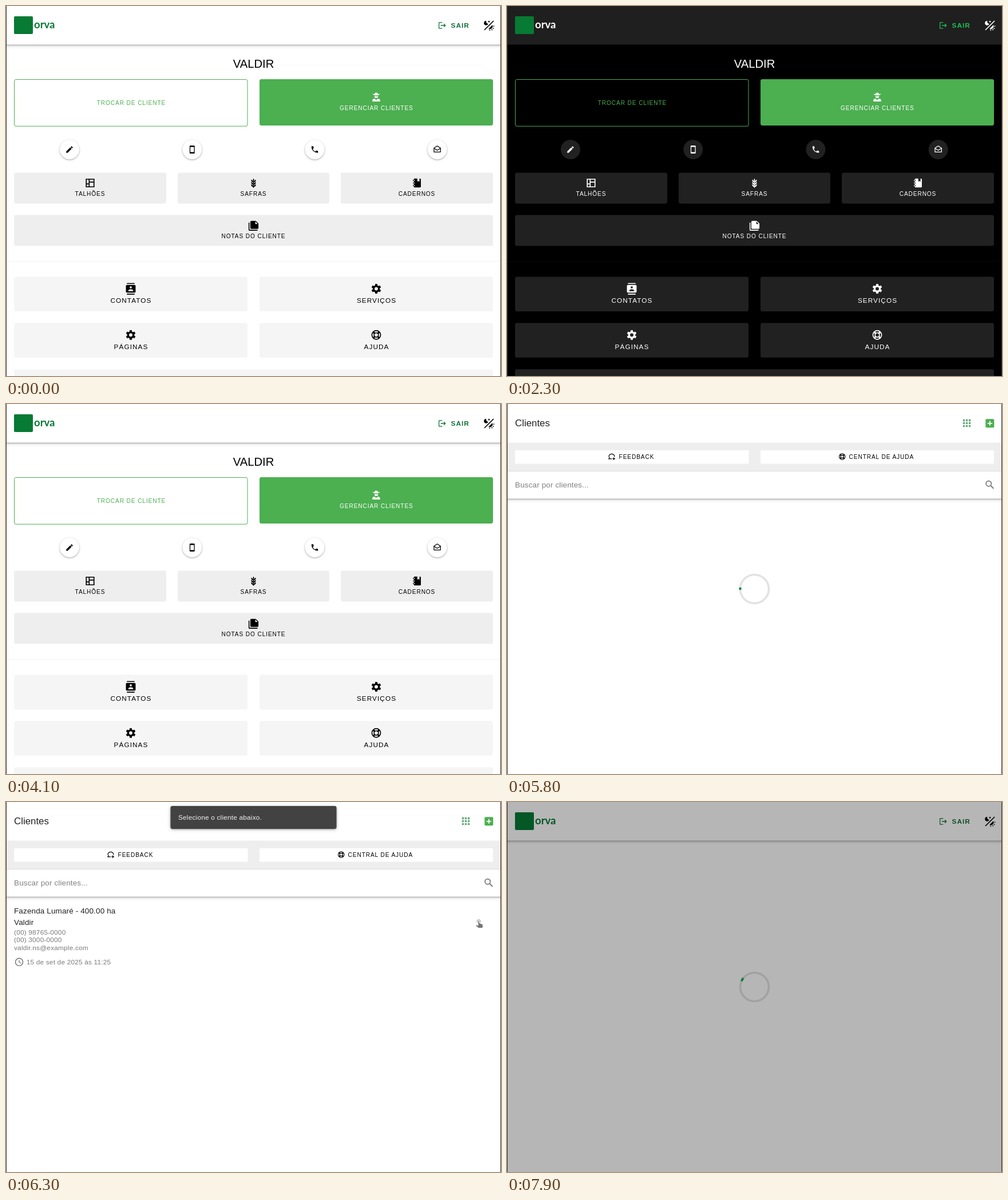
These frames come from a looping animation (865 px wide and 647 px high, 8 s). An HTML page:

```html
<!DOCTYPE html>
<html lang="pt-BR">
<head>
<meta charset="utf-8">
<title>Clientes</title>
<style>
html, body { margin: 0; width: 100%; height: 100%; overflow: hidden; background: #fff; }
svg { display: block; width: 865px; height: 647px; }
text { font-family: "Liberation Sans", Arial, sans-serif; white-space: pre; }
.btn { font-size: 10.125px; letter-spacing: .0893em; }
.big { font-size: 11.8px; letter-spacing: .0893em; }
.body { font-size: 13.5px; letter-spacing: .0094em; }
.small { font-size: 11.8px; letter-spacing: .0179em; }
.ink { fill: var(--ink); color: var(--ink); }
.accent { fill: var(--accent); color: var(--accent); }
.green { fill: #4caf50; }
.line { fill: none; stroke: currentColor; }
.raised { filter: drop-shadow(0 1.5px 1px rgba(0,0,0,.24)) drop-shadow(0 1px 2px rgba(0,0,0,.14)); }
.bar { filter: drop-shadow(0 1.5px 1.5px rgba(0,0,0,.3)) drop-shadow(0 1px 3px rgba(0,0,0,.18)); }
</style>
</head>
<body>
<svg id="stage" viewBox="0 0 865 647" xmlns="http://www.w3.org/2000/svg"></svg>
<script>
const LOOP = 8000, STEP = 100;
const DARK_AT = 1200, LIGHT_AT = 2400, LIST_AT = 5800, READY_AT = 6300, LOAD_AT = 7900;
const FADE = 280;
const GREEN = '#077a34';
const stage = document.getElementById('stage');

const fill = d => `<path d="${d}" fill-rule="evenodd"/>`;
const line = (d, w = 2) => `<path class="line" d="${d}" stroke-width="${w}"/>`;
const ring = (r, w = 2) => `<circle class="line" cx="12" cy="12" r="${r}" stroke-width="${w}"/>`;
const spokes = (n, from, a, b, w) => Array.from({ length: n }, (_, i) =>
  `<g transform="rotate(${from + i * 360 / n} 12 12)">${line(`M12 ${12 - a}V${12 - b}`, w)}</g>`).join('');
const leaves = [4, 9.25, 14.5].map(y =>
  `M11 ${y + 4.4}Q10 ${y + 2} 6.5 ${y}Q6 ${y + 5} 11 ${y + 6.8}ZM13 ${y + 4.4}Q14 ${y + 2} 17.5 ${y}Q18 ${y + 5} 13 ${y + 6.8}Z`).join('');
const squares = [4, 10, 16].flatMap(x => [4, 10, 16].map(y => `M${x} ${y}h4v4h-4z`)).join('');

const ICONS = {
  pencil: fill('M20.71 7.04C21.1 6.65 21.1 6 20.71 5.63L18.37 3.29C18 2.9 17.35 2.9 16.96 3.29L15.12 5.12L18.87 8.87M3 17.25V21H6.75L17.81 9.93L14.06 6.18Z'),
  mobile: fill('M17 19H7V5H17M17 1H7A2 2 0 0 0 5 3V21A2 2 0 0 0 7 23H17A2 2 0 0 0 19 21V3A2 2 0 0 0 17 1Z'),
  phone: fill('M6.62 10.79C8.06 13.62 10.38 15.94 13.21 17.38L15.41 15.18C15.69 14.9 16.08 14.82 16.43 14.93C17.55 15.3 18.75 15.5 20 15.5A1 1 0 0 1 21 16.5V20A1 1 0 0 1 20 21A17 17 0 0 1 3 4A1 1 0 0 1 4 3H7.5A1 1 0 0 1 8.5 4C8.5 5.25 8.7 6.45 9.07 7.57C9.18 7.92 9.1 8.31 8.82 8.59Z'),
  mail: line('M3 8L12 2L21 8V18Q21 19 20 19H4Q3 19 3 18ZM3 8.5L12 14L21 8.5'),
  plots: line('M4 4H20V20H4ZM10 4V20M10 10H20M4 14H10'),
  wheat: fill(leaves + 'M12 1.2Q9.2 5.5 12 9.5Q14.8 5.5 12 1.2ZM11 9H13V23H11Z'),
  notebook: fill('M3 7V5H5V4A2 2 0 0 1 7 2H13V9L15.5 7.5L18 9V2H19A2 2 0 0 1 21 4V20A2 2 0 0 1 19 22H7A2 2 0 0 1 5 20V19H3V17H5V13H3V11H5V7ZM5 5V7H7V5ZM5 11V13H7V11ZM5 17V19H7V17Z'),
  notes: fill('M16 9H21.5L16 3.5V9M7 2H17L23 8V18A2 2 0 0 1 21 20H7A2 2 0 0 1 5 18V4A2 2 0 0 1 7 2M3 6V22H21V24H3A2 2 0 0 1 1 22V6Z'),
  contacts: fill('M20 0H4V2H20ZM4 24H20V22H4ZM20 4H4A2 2 0 0 0 2 6V18A2 2 0 0 0 4 20H20A2 2 0 0 0 22 18V6A2 2 0 0 0 20 4M12 6.75A2.25 2.25 0 0 1 12 11.25A2.25 2.25 0 0 1 12 6.75M17 17H7V15.5C7 13.83 10.33 13 12 13C13.67 13 17 13.83 17 15.5Z'),
  cog: ring(5.5, 4) + spokes(6, 0, 6.5, 10, 4.8),
  buoy: ring(9) + ring(4.5) + spokes(4, 45, 4.5, 9, 3.6),
  farmer: fill('M8.5 5.5Q9 2 10.5 2.5Q12 3.5 13.5 2.5Q15 2 15.5 5.5Q18 5.5 20 4.5Q18.5 8.2 12 8.2Q5.5 8.2 4 4.5Q6 5.5 8.5 5.5ZM8 9.5A4 4.2 0 0 0 16 9.5Q12 10.6 8 9.5ZM4 21V19Q4 15 8.5 15L12 17.5L15.5 15Q20 15 20 19V21Z'),
  exit: fill('M17 7L15.59 8.41L18.17 11H8V13H18.17L15.59 15.58L17 17L22 12M4 5H12V3H4A2 2 0 0 0 2 5V19A2 2 0 0 0 4 21H12V19H4Z'),
  theme: line('M2.5 21.5L21.5 2.5') + line('M21 13.5H23M20 17.5L21.8 18.8M17.5 20L18.8 21.8M13.5 21V23', 1.8) +
    fill('M6.5 2.5A4.6 4.6 0 1 0 10.5 8.5A4.4 4.4 0 0 1 6.5 2.5ZM11 19A6 6 0 0 0 19 11ZM12 1.5L12.8 3.2L14.5 4L12.8 4.8L12 6.5L11.2 4.8L9.5 4L11.2 3.2Z'),
  grid: fill(squares),
  chat: line('M12 18.5H3.5L5.6 15.6A8.2 6.8 0 1 1 20 12.5') + line('M18 14V22M14 18H22'),
  search: ring(0) + line('M14 14L19.7 19.7', 2.2) + '<circle class="line" cx="9.5" cy="9.5" r="5.5" stroke-width="2"/>',
  tap: line('M8.5 12A3.5 3.5 0 1 1 13.5 12', 1) +
    fill('M10 9A1 1 0 0 1 12 9V13.47L13.21 13.6L18.15 15.79Q19 16.2 19 17.14V21.5Q18.9 22.9 17.5 23H11Q10.4 23 10 22.57L5.1 18.37L5.84 17.6Q6.2 17.2 6.8 17.28L10 19Z'),
  clock: ring(9) + line('M12 7V12.4L16.2 15', 1.6)
};

const icon = (name, x, y, size = 20.25, cls = 'ink') =>
  `<g class="${cls}" transform="translate(${x - size / 2} ${y - size / 2}) scale(${size / 24})">${ICONS[name]}</g>`;
const rect = (x, y, w, h, attrs = '') => `<rect x="${x}" y="${y}" width="${w}" height="${h}" ${attrs}/>`;
const label = (s, x, y, cls, attrs = '') => `<text x="${x}" y="${y}" class="${cls}" ${attrs}>${s}</text>`;
const mid = (s, x, y, cls, attrs = '') => label(s, x, y, cls, 'text-anchor="middle" ' + attrs);
const round = 'rx="3.4"';

// Grey tiles carry their light shade; the theme fade mixes it towards dark.
const tile = (x, y, w, h, shade) => rect(x, y, w, h, `${round} class="tile" data-shade="${shade}"`);
const tileBtn = (x, w, y, text, name, size) =>
  tile(x, y, w, 54, 238) + icon(name, x + w / 2, y + 18, size) + mid(text, x + w / 2, y + 40.5, 'btn ink');
const menuBtn = (x, y, text, name) =>
  tile(x, y, 408, 60.5, 245) + icon(name, x + 204, y + 21) + mid(text, x + 204.5, y + 45.5, 'big ink');
const roundBtn = (x, name) =>
  `<circle class="tile raised" data-shade="255" cx="${x}" cy="251" r="17"/>` + icon(name, x, 251, 15.2);

const header = rect(-8, -8, 881, 75.5, 'class="bar" style="fill:var(--bar)"') +
  `<g class="logo">${rect(14, 18, 33, 31, `rx="2" fill="${GREEN}"`)}
   <text x="49" y="38.5" style="font:bold 18.5px Lato,sans-serif;fill:var(--word)">orva</text></g>` +
  icon('exit', 762.3, 34, 15.2, 'accent') +
  label('SAIR', 777.5, 38, 'big accent', 'font-weight="bold"') +
  icon('theme', 844, 34);

const home = mid('VALDIR', 432.5, 108, 'ink', 'font-size="20.25"') +
  rect(14.5, 128.5, 407.5, 81.7, 'rx="3" fill="none" stroke="#4caf50"') +
  mid('TROCAR DE CLIENTE', 219, 172.8, 'btn green') +
  rect(443, 128, 408, 81, round + ' class="green"') +
  `<g style="--ink:#fff">${icon('farmer', 647, 159.5)}${mid('GERENCIAR CLIENTES', 647.4, 182, 'btn ink')}</g>` +
  roundBtn(111, 'pencil') + roundBtn(325.3, 'mobile') + roundBtn(539.5, 'phone') + roundBtn(753.6, 'mail') +
  tileBtn(14, 266, 291.5, 'TALHÕES', 'plots') +
  tileBtn(300, 265, 291.5, 'SAFRAS', 'wheat', 18) +
  tileBtn(585, 266, 291.5, 'CADERNOS', 'notebook', 18.5) +
  tileBtn(14, 837, 365.5, 'NOTAS DO CLIENTE', 'notes', 18.8) +
  rect(1, 446, 863, 1, 'style="fill:var(--rule)"') +
  menuBtn(14, 473.5, 'CONTATOS', 'contacts') + menuBtn(443, 473.5, 'SERVIÇOS', 'cog') +
  menuBtn(14, 554.3, 'PÁGINAS', 'cog') + menuBtn(443, 554.3, 'AJUDA', 'buoy') +
  tile(14, 635.3, 837, 40, 245);

const rows = [['(00) 98765-0000', 232], ['(00) 3000-0000', 245.4], ['valdir.ns@example.com', 258.8], ];
const list = rect(-8, 60, 881, 105.5, 'fill="#fff" class="bar"') +
  rect(0, 0, 865, 68, 'fill="#fff"') + rect(0, 67.5, 865, 50, 'fill="#eee"') + rect(0, 117, 865, 1, 'fill="#ddd"') +
  label('Clientes', 14, 39, '', 'font-size="16.875" fill="#212121"') +
  `<g fill="#66a67d">${icon('grid', 803.5, 33.5, 20.25, '')}</g>` +
  rect(836.3, 26.3, 15, 15, 'rx="2" class="green"') +
  '<path d="M843.8 29.8V37.8M839.8 33.8H847.8" stroke="#fff" stroke-width="1.8"/>' +
  rect(14, 81, 408.5, 23.5, 'rx="2" fill="#fff"') + rect(443, 81, 408, 23.5, 'rx="2" fill="#fff"') +
  icon('chat', 183, 92, 14.5) + label('FEEDBACK', 195.6, 96, 'btn ink') +
  icon('buoy', 585.7, 92, 13.8) + label('CENTRAL DE AJUDA', 597.6, 96, 'btn ink') +
  label('Buscar por clientes...', 14, 146, 'body', 'fill="#808080"') +
  `<g style="--ink:#757575">${icon('search', 843.8, 141.3)}</g>`;

const results = label('Fazenda Lumaré - 400.00 ha', 14, 195, 'body', 'fill="#212121"') +
  label('Valdir', 14, 215, 'body', 'fill="#212121"') +
  rows.map(([s, y]) => label(s, 14, y, 'small', 'fill="#7a7a7a"')).join('') +
  label('15 de set de 2025 às 11:25', 35.7, 283.5, 'small', 'fill="#7a7a7a"') +
  `<g style="--ink:#757575">${icon('clock', 23, 279.8, 17.5)}${icon('tap', 827, 210.8)}</g>` +
  rect(287.5, 7, 290, 40, round + ' fill="#424242" class="bar"') +
  label('Selecione o cliente abaixo.', 301, 31.3, 'small', 'fill="#f2f2f2"');

const spinner = '<circle cx="432.5" cy="323.5" r="25" fill="none" stroke="rgba(0,0,0,.115)" stroke-width="3.6"/>' +
  `<circle id="arc" cx="432.5" cy="323.5" r="25" fill="none" stroke="#0a7f37" stroke-width="3.8"/>`;

const group = (id, body) => `<g id="${id}">${body}</g>`;
stage.innerHTML = rect(0, 0, 865, 647, 'style="fill:var(--bg)"') +
  group('home', home) + group('head', header) + group('list', list) + group('results', results) +
  group('dim', rect(0, 0, 865, 647, 'fill="#000" opacity=".288"')) + group('spinner', spinner) +
  '<path d="M.5 0V647M864.5 0V647" stroke="#333"/>';

const part = id => document.getElementById(id);
const show = (id, on) => { part(id).style.display = on ? '' : 'none'; };
const tiles = [...stage.querySelectorAll('.tile')];
const logo = stage.querySelector('.logo');

// Cubic easing with control points (x1, 0) and (x2, 1).
function ease(x1, x2, x) {
  if (x <= 0) return 0;
  if (x >= 1) return 1;
  let lo = 0, hi = 1;
  for (let i = 0; i < 24; i++) {
    const s = (lo + hi) / 2, r = 1 - s;
    if (3 * r * r * s * x1 + 3 * r * s * s * x2 + s ** 3 < x) lo = s; else hi = s;
  }
  return 3 * (1 - lo) * lo * lo + lo ** 3;
}

function setTheme(t) {
  const dark = t >= DARK_AT && t < LIGHT_AT;
  const vars = dark
    ? { bg: '#000', bar: '#1f1f1f', ink: '#fff', accent: '#1fc05a', rule: '#070707', word: '#fff' }
    : { bg: '#fff', bar: '#fff', ink: '#000', accent: '#0f7038', rule: '#f3f3f3', word: GREEN };
  for (const k in vars) stage.style.setProperty('--' + k, vars[k]);
  const fade = start => ease(.4, .2, (t - start) / FADE);
  const mix = dark ? fade(DARK_AT - 49) : t < DARK_AT ? 0 : 1 - fade(LIGHT_AT);
  for (const el of tiles) {
    const v = Math.round(+el.dataset.shade * (1 - mix) + 33 * mix);
    el.setAttribute('fill', `rgb(${v},${v},${v})`);
  }
  logo.style.display = dark && t < DARK_AT + STEP ? 'none' : '';
}

function setArc(ms) {
  const p = ms / 1400 % 1;
  const grow = ease(.42, .58, p * 2), slide = ease(.42, .58, p * 2 - 1);
  const len = Math.max(4, (1 + 99 * grow) * 1.25);
  const offset = -(15 * grow + 109 * slide) * 1.25;
  const arc = part('arc');
  arc.setAttribute('stroke-dasharray', `${len} 250`);
  arc.setAttribute('stroke-dashoffset', offset);
  arc.setAttribute('transform', `rotate(${177 + 360 * p} 432.5 323.5)`);
}

function draw(t) {
  const inList = t >= LIST_AT && t < LOAD_AT, loading = t >= LOAD_AT;
  setTheme(t);
  show('home', t < LIST_AT);
  show('head', !inList);
  show('list', inList);
  show('results', inList && t >= READY_AT);
  show('dim', loading);
  show('spinner', loading || inList && t < READY_AT);
  setArc(loading ? t - LOAD_AT + 100 : t - LIST_AT);
}

const began = performance.now();
let last = -1;
function tick() {
  const t = Math.floor((performance.now() - began) % LOOP / STEP) * STEP;
  if (t !== last) draw(last = t);
  requestAnimationFrame(tick);
}
tick();
</script>
</body>
</html>
```
